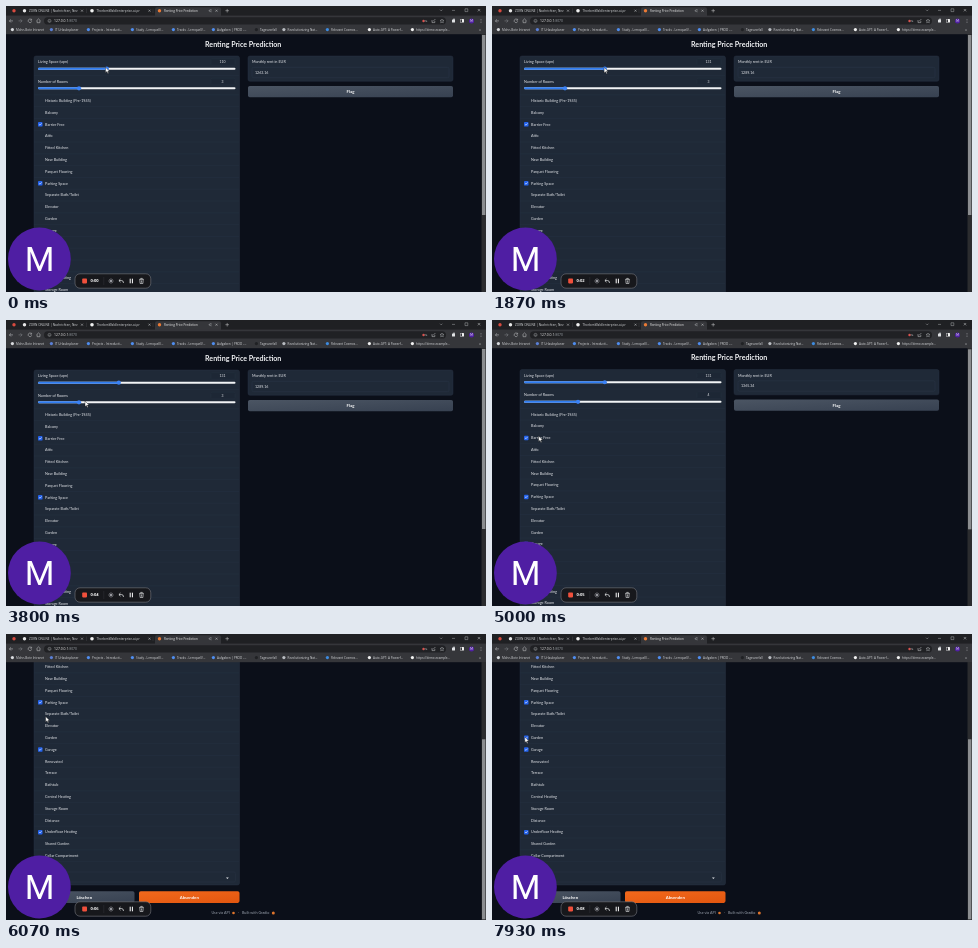
These frames come from a looping animation (480x286 px, 8 s). An HTML page:

```html
<!DOCTYPE html>
<html lang="en">
<head>
<meta charset="utf-8">
<title>Renting Price Prediction</title>
<style>
  html, body { margin: 0; width: 100%; height: 100%; overflow: hidden; background: #0b0f19; }
  svg { display: block; width: 100vw; height: 100vh; }
  text { font-family: Lato, "Open Sans", sans-serif; white-space: pre; }
  .ui { font-family: "Open Sans", Roboto, sans-serif; }
</style>
</head>
<body>
<svg id="stage" viewBox="0 0 480 286">
  <defs>
    <linearGradient id="grey" x2="1" y2="1"><stop stop-color="#4b5563"/><stop offset="1" stop-color="#374151"/></linearGradient>
    <linearGradient id="orange" x2="1" y2="1"><stop stop-color="#f2691c"/><stop offset="1" stop-color="#e2560f"/></linearGradient>
  </defs>
  <rect width="480" height="286" fill="#0b0f19"/>
  <g id="page"></g>
  <g id="browser"></g>
  <g id="overlay"></g>
  <path id="cursor" d="M0 0V5.6L1.4 4.4 2.3 6.4 3.2 6 2.3 4.1H4.1Z" fill="#fff" stroke="#111" stroke-width=".4"/>
</svg>
<script>
const DURATION = 8000, ROW_TOP = 94.7, ROW_STEP = 11.8, VIEW_TOP = 28, MAX_SCROLL = 109;
const $ = id => document.getElementById(id);

const text = (x, y, str, size = 3.78, extra = 'fill="#e5e7eb"') =>
  `<text x="${x}" y="${y}" dy=".35em" font-size="${size}" ${extra}>${str}</text>`;
const rect = (x, y, w, h, fill, r = 0, extra = '') =>
  `<rect x="${x}" y="${y}" width="${w}" height="${h}" rx="${r}" fill="${fill}" ${extra}/>`;
const dot = (x, y, r, fill, extra = '') => `<circle cx="${x}" cy="${y}" r="${r}" fill="${fill}" ${extra}/>`;
const line = (d, color = '#c8cacd', width = .5) =>
  `<path d="${d}" fill="none" stroke="${color}" stroke-width="${width}"/>`;
const ui = (x, y, str, size = 3.1, fill = '#d5d7da') => text(x, y, str, size, `class="ui" fill="${fill}"`);
const button = (x, y, w, h, fill, label) => rect(x, y, w, h, `url(#${fill})`, 1.8) +
  text(x + w / 2, y + h / 2, label, 4.3, 'fill="#fff" font-weight="700" text-anchor="middle"');

const slider = (id, y, label) =>
  text(32, y - 6.8, label) +
  rect(205, y - 10, 24, 6.6, '#1d2735', 1, 'stroke="#2a3646" stroke-width=".3"') +
  text(216.5, y - 6.6, '', 3.4, `id="${id}Value" fill="#e5e7eb" text-anchor="middle"`) +
  rect(32, y - 1, 197.5, 2, '#f1f3f5', 1) +
  rect(32, y - 1, 0, 2, '#2f7cf0', 1, `id="${id}Fill"`) +
  dot(0, y, 2.1, '#3b82f6', `id="${id}Thumb"`);

const features = ['Historic Building (Pre-1945)', 'Balcony', 'Barrier Free', 'Attic', 'Fitted Kitchen',
  'New Building', 'Parquet Flooring', 'Parking Space', 'Separate Bath/Toilet', 'Elevator', 'Garden',
  'Garage', 'Renovated', 'Terrace', 'Bathtub', 'Central Heating', 'Storage Room', 'Distance',
  'Underfloor Heating', 'Shared Garden', 'Cellar Compartment'];
const ticked = ['Barrier Free', 'Parking Space', 'Garden', 'Garage', 'Underfloor Heating'];

const feature = (name, i) => {
  const y = ROW_TOP + i * ROW_STEP;
  const tick = ticked.includes(name)
    ? `<g id="${name}">${rect(32, y - 2.2, 4.5, 4.5, '#2563eb', .9)}${line(`M33.1 ${y}l.9 .9 1.6-1.8`, '#fff', .6)}</g>` : '';
  return line(`M28 ${y - 5.9}H233`, '#283444', .4) + tick + text(39, y, name);
};

$('page').innerHTML =
  text(237.2, 38.2, 'Renting Price Prediction', 7.1, 'fill="#f3f4f6" font-weight="700" text-anchor="middle"') +
  rect(28, 50, 205.5, 310, '#1f2937', 2, 'stroke="#2b3747" stroke-width=".4"') +
  line('M28 69.6H233', '#283444', .4) +
  slider('space', 62.7, 'Living Space (sqm)') +
  slider('rooms', 82.3, 'Number of Rooms') +
  features.map(feature).join('') +
  line('M28 336.6H233', '#283444', .4) +
  rect(32, 347, 197.5, 10, '#1f2937', 1.5, 'stroke="#2b3747" stroke-width=".4"') +
  '<path d="M220 352.4h2.8l-1.4 1.7Z" fill="#e5e7eb"/>' +
  rect(242, 50, 205, 25.3, '#1f2937', 2, 'stroke="#2b3747" stroke-width=".4"') +
  text(246, 56, 'Monthly rent in EUR') +
  rect(246, 61.3, 197, 10.4, '#1f2937', 1.5, 'stroke="#2f3b4c" stroke-width=".4"') +
  text(249, 66.6, '', 3.6, 'id="rent" fill="#e5e7eb"') +
  button(242, 80, 205, 11.2, 'grey', 'Flag') +
  button(28, 366.3, 100.5, 11.6, 'grey', 'Löschen') +
  button(133, 366.3, 100.5, 11.6, 'orange', 'Absenden') +
  text(205.5, 388, 'Use via API', 3.7, 'fill="#9ca3af"') + dot(227.5, 388, 1.3, '#e0752c') +
  text(232, 388, '·', 3.7, 'fill="#9ca3af"') +
  text(236, 388, 'Built with Gradio', 3.7, 'fill="#9ca3af"') + dot(267.3, 388, 1.5, '#e0752c');

const cross = (x, y, r = 1) => line(`M${x - r} ${y - r}l${2 * r} ${2 * r}m0 ${-2 * r}l${-2 * r} ${2 * r}`);
const bookmarks = [
  [10, 'Mohn-Bote Intranet', '#d8dade'], [49, 'IT Urlaubsplaner', '#5a7fd6'],
  [86, 'Projects - Introducti…', '#4f8df0'], [130, 'Study - Lernquell/…', '#4f8df0'],
  [171, 'Tracks - Lernquell/…', '#4f8df0'], [211, 'Aufgaben | PROD -…', '#4f8df0'],
  [254, 'Tagesvorfall', '#202124'], [281.5, 'Revolutionizing Nat…', '#b9bcc1'],
  [325, 'Relevant Cosmos…', '#3d8be0'], [367, 'Auto-GPT: A Powerf…', '#f1f1f1'],
  [410, 'https://demo.example…', '#f1f1f1']];

$('browser').innerHTML =
  rect(0, 0, 480, 10, '#1f2023') +
  rect(149, 1.2, 66, 10, '#35363a', 2) +
  rect(0, 9.6, 480, 18.6, '#35363a') +
  dot(8, 4.7, 1.7, '#d84a3f') +
  dot(18.5, 4.7, 1.7, '#e8e8e8') + ui(23, 4.7, 'ZORN ONLINE | Nachrichten, Nev') + cross(76, 4.7) +
  line('M80.5 2.5V7M147 2.5V7', '#55575b', .3) +
  dot(86, 4.7, 1.8, '#f1f1f1') + ui(90.5, 4.7, 'ThorbenWald/enterprise-ai-pr') + cross(143.5, 4.7) +
  dot(153.5, 4.7, 1.7, '#ea7a35') + ui(158, 4.7, 'Renting Price Prediction', 3.05, '#f1f1f1') + cross(210.5, 4.7) +
  line('M203 4.2h1l1-1v3l-1-1h-1Z', '#c8cacd', .35) +
  line('M219.4 4.7h3.6m-1.8-1.8v3.6') +
  line('M434 3.7l1.2 1.2 1.2-1.2M446 4.4h3M459 2.8h2.8v2.8H459Z', '#c8cacd', .4) + cross(473, 4.2, 1.2) +
  rect(38, 11.2, 402, 7.4, '#202124', 3.7) +
  line('M7 14.9H3.4m1.6-1.6-1.6 1.6 1.6 1.6') +
  line('M12.5 14.9h3.6m-1.6-1.6 1.6 1.6-1.6 1.6', '#85888d') +
  line('M25.4 13.7a1.8 1.8 0 1 0 .3 1.6M25.6 12.8v1.4h-1.4') +
  line('M30.5 14.8l2-1.9 2 1.9M31.1 14.5v2.2h2.8v-2.2') +
  dot(43.5, 14.9, 1.5, 'none', 'stroke="#c8cacd" stroke-width=".4"') + line('M43.5 14.7v1', '#c8cacd', .4) +
  ui(48, 14.9, '127.0.0.1<tspan fill="#9aa0a6">:8070</tspan>', 3.4, '#f1f1f1') +
  dot(417.5, 15, 1.2, '#d9534f') + line('M418.5 14.9h2.2v1') +
  line('M426 14v2.6h2.8V15M427 15.4l2.4-2.4') +
  line('M436 13l.6 1.3 1.4.1-1.1 1 .4 1.4-1.3-.8-1.3.8.4-1.4-1.1-1 1.4-.1Z', '#c8cacd', .4) +
  rect(446, 13.4, 3, 3, '#dfe1e4', .5) + dot(448, 13.3, .8, '#dfe1e4') +
  rect(454, 13, 4, 3.6, '#f1f1f1', .5) + rect(454.4, 13.4, 1.6, 2.8, '#35363a') +
  dot(465.5, 14.9, 2.5, '#5120a5') + text(465.5, 14.9, 'M', 2.8, 'fill="#fff" text-anchor="middle"') +
  [13.4, 14.9, 16.4].map(y => dot(475, y, .4, '#d5d7da')).join('') +
  bookmarks.map(([x, label, color]) => dot(x - 3.6, 23.6, 1.6, color) + ui(x, 23.6, label, 3.05)).join('') +
  ui(473, 23.4, '»', 4) +
  rect(475.5, VIEW_TOP, 4.5, 258, '#2b2c2f') +
  rect(476, 0, 3.4, 180, '#8b8d90', 0, 'id="scrollbar"');

$('overlay').innerHTML =
  dot(33.4, 253, 31.4, '#4f1ea3') +
  text(33.6, 253.2, 'M', 34, 'fill="#fff" text-anchor="middle" style="font-family:Roboto,sans-serif"') +
  rect(69, 267.8, 75.8, 14.4, '#17181c', 5, 'stroke="#777a80" stroke-width=".6"') +
  rect(76.2, 272.6, 4.8, 4.8, '#f0503c', .8) +
  text(84.5, 275, '', 4.1, 'id="clock" class="ui" fill="#fff" font-weight="700"') +
  line('M97.8 271v8', '#3a3c42', .4) +
  line('M105 272.3v5.4M102.3 275h5.4M103.3 273.3l3.4 3.4m0-3.4-3.4 3.4', '#c9cbd0', .5) +
  line('M114.5 273l-1.6 1.6 1.6 1.6M113 274.6h2.7q1.8 0 1.8 2.4', '#eceef0', .7) +
  line('M124.2 272.7v4.6M126.4 272.7v4.6', '#fff', 1) +
  line('M133.2 273.4h4.6M134.7 273.2v-.8h1.6v.8M133.8 273.6l.3 3.9h2.8l.3-3.9M135.5 274.4v2.3', '#eceef0', .6);

// Each track is a list of [time, ...values], eased between neighbours.
const cursorTrack = [[0, 99.5, 61.2], [250, 99.5, 61.2], [1250, 112, 61.4], [2500, 112.2, 61.4],
  [3300, 84, 80], [3800, 79, 81], [4020, 73, 81], [4400, 86, 81], [4900, 46.6, 116.2], [5200, 46.6, 115.4],
  [6070, 39.6, 82.4], [6600, 40, 90], [7400, 36, 101], [7750, 32.8, 103], [8000, 32.8, 103]];
const spaceTrack = [[0, 100.8], [250, 100.8], [1250, 112.8], [8000, 112.8]];
const scrollTrack = [[0, 0], [5000, 0], [5130, 61], [5300, MAX_SCROLL], [8000, MAX_SCROLL]];
const smooth = k => k * k * (3 - 2 * k);

function sample(track, t, ease = smooth) {
  const i = track.findIndex(key => key[0] > t);
  const [from, to] = [track[i - 1], track[i]];
  const k = ease((t - from[0]) / (to[0] - from[0]));
  return from.slice(1).map((v, j) => v + (to[j + 1] - v) * k);
}

function setSlider(id, x, value) {
  $(id + 'Fill').setAttribute('width', x - 32);
  $(id + 'Thumb').setAttribute('cx', x);
  $(id + 'Value').textContent = value;
}

function draw(now) {
  const t = now % DURATION;
  const [scroll] = sample(scrollTrack, t, k => k);
  const [spaceX] = sample(spaceTrack, t);
  const rooms = t < 4250 ? 3 : 4;

  setSlider('space', spaceX, Math.round(110 + (spaceX - 100.8) * 1.75));
  setSlider('rooms', 73 + (rooms - 3) * 13, rooms);
  $('rent').textContent = t < 1450 ? '1263.16' : t < 4550 ? '1289.16' : '1365.34';
  $('Garden').style.display = t < 7800 ? 'none' : '';
  $('page').setAttribute('transform', `translate(0 ${-scroll})`);
  $('scrollbar').setAttribute('y', VIEW_TOP + 1 + scroll * .7);
  $('clock').textContent = `0:0${Math.floor((t + 200) / 1000)}`;
  $('cursor').setAttribute('transform', `translate(${sample(cursorTrack, t)})`);
  requestAnimationFrame(() => draw(performance.now()));
}
draw(performance.now());
</script>
</body>
</html>
```
